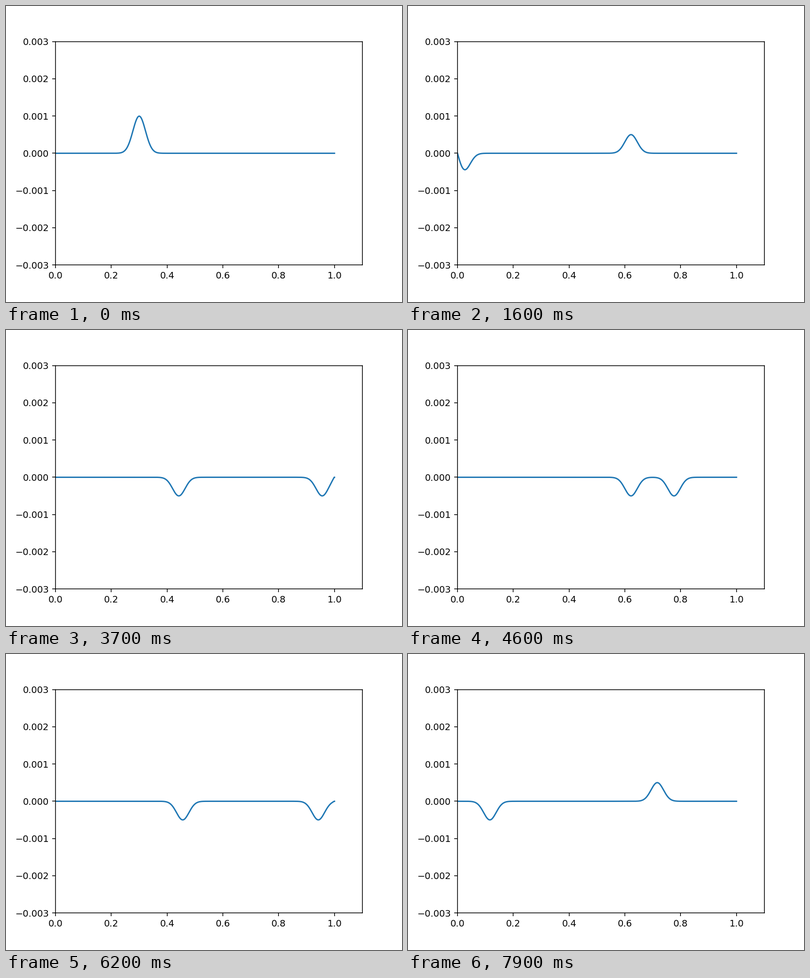
These frames come from a looping animation (840x630 px, 8 s). A matplotlib script:

```python
import numpy as np
import matplotlib.pyplot as plt
from matplotlib.animation import FuncAnimation

FRAMES, INTERVAL = 80, 100
DX = 0.001            # grid step; the wave moves one step per time step
STEPS = 20            # time steps per frame
WALL = 1 - DX         # the last grid point stays at rest

x = np.linspace(0, 1, 1001)


def pulse(s):
    """Initial bump, continued as an odd function mirrored at both walls."""
    s = (s + WALL) % (2 * WALL) - WALL
    bump = np.exp(-1000 * (np.abs(s) - 0.3) ** 2) / 1000
    return np.sign(s) * bump


def string(n):
    shift = (STEPS * n + 2) * DX
    y = (pulse(x - shift) + pulse(x + shift)) / 2
    y[[0, -2, -1]] = 0
    return y


fig = plt.figure(figsize=(6, 4.5), dpi=140)
fig.subplots_adjust(left=0.125, right=0.9, bottom=0.125, top=0.88)
ax = fig.add_subplot(xlim=(0, 1.1), ylim=(-0.003, 0.003))
line, = ax.plot(x, string(0))


def update(n):
    line.set_ydata(string(n))
    return line,


anim = FuncAnimation(fig, update, frames=FRAMES, interval=INTERVAL,
                     repeat=True, repeat_delay=0)
plt.show()
```
